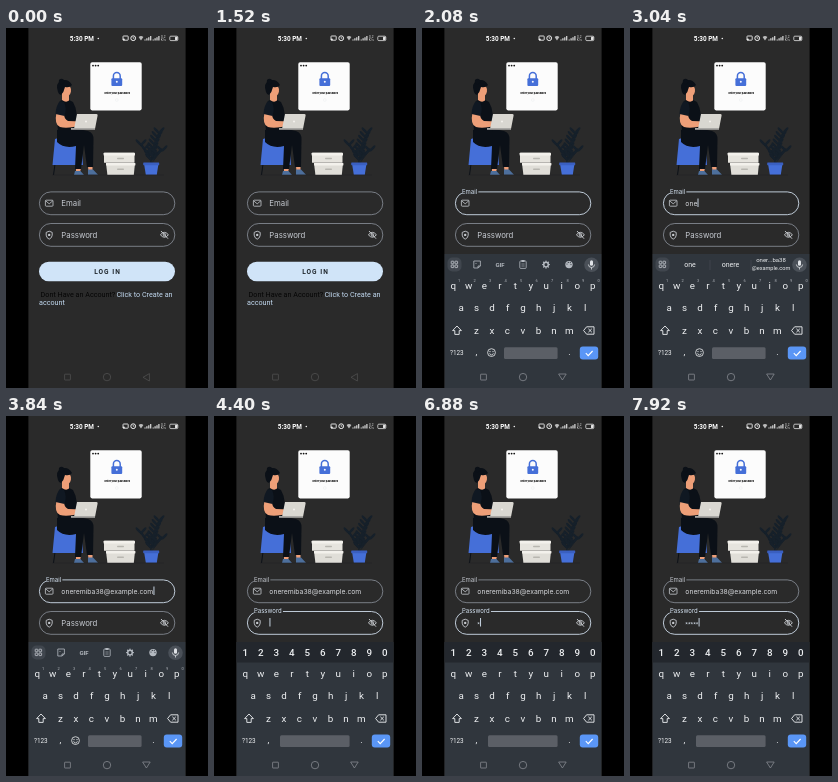
An HTML page with a canvas for the animation above (8000 ms loop, 202 by 360 pixels).

```html
<!DOCTYPE html>
<html lang="en">
<head>
<meta charset="utf-8">
<title>Login screen</title>
<style>
html, body { margin: 0; width: 100%; height: 100%; overflow: hidden; background: #000; }
canvas { display: block; width: 100vw; height: 100vh; }
</style>
</head>
<body>
<canvas id="stage"></canvas>
<script>
const W = 202, H = 360, LOOP = 8000;
const APP_X = 22.4, APP_W = 157.2;
const canvas = document.getElementById('stage');
const c = canvas.getContext('2d');
const BG = '#2a2a2a', BLUE = '#456fd8', SKIN = '#ee9f78', INK = '#0b1017', KEY = '#eef0f2';
const EMAIL = 'oneremiba38@example.com';
const INTER = 'Inter, sans-serif', ROBOTO = 'Roboto, sans-serif';

// Timeline (ms)
const EMAIL_FOCUS = 1570, KEYBOARD_UP = 1600, NAV_SWITCH = 1820, AUTOFILL = 3770, PASSWORD_FOCUS = 4290;
const emailKeys = [[2580, 'o'], [2760, 'n'], [2980, 'e']];
const passwordKeys = [
  [5080, '1'], [5270, '2'], [5460, '3'], [5650, '4'],
  [6230, '<'], [6470, '<'], [6790, '<'], [7030, '<'],
  [7440, 's'], [7550, 'd'], [7660, 'f'], [7760, 'g'], [7860, 'h']
];
const allKeys = [...emailKeys, ...passwordKeys];
const actions = [EMAIL_FOCUS, AUTOFILL, PASSWORD_FOCUS, ...allKeys.map(k => k[0])];

const clamp = v => Math.max(0, Math.min(1, v));
const easeOut = v => 1 - (1 - clamp(v)) ** 3;
const mix = (a, b, k) => a + (b - a) * k;

function box(x, y, w, h, r, fill, stroke, lw = 0.8) {
  c.beginPath();
  c.roundRect(x, y, w, h, r);
  if (fill) { c.fillStyle = fill; c.fill(); }
  if (stroke) { c.strokeStyle = stroke; c.lineWidth = lw; c.stroke(); }
}
const dot = (x, y, r, fill, stroke, lw) => box(x - r, y - r, 2 * r, 2 * r, r, fill, stroke, lw);
function shape(d, fill) {
  c.fillStyle = fill;
  c.fill(new Path2D(d));
}
function line(d, stroke, lw = 0.8) {
  c.strokeStyle = stroke;
  c.lineWidth = lw;
  c.stroke(new Path2D(d));
}
function text(s, x, y, size, fill, font = ROBOTO, align = 'left', weight = 400) {
  c.font = `${weight} ${size}px ${font}`;
  c.textAlign = align;
  c.fillStyle = fill;
  c.fillText(s, x, y);
  return c.measureText(s).width;
}

function statusBar() {
  text('5:30 PM', 63.8, 12.5, 6.4, '#fff', ROBOTO, 'left', 700);
  dot(92.3, 10.5, 0.8, '#eee');
  box(117, 8, 5.2, 4.2, 0.6, null, '#eee', 0.9);
  dot(117.8, 11.6, 1, '#eee');
  dot(127.2, 10.2, 2.4, null, '#eee', 1);
  line('M127.2 8.8V10.3H128.4', '#eee', 0.7);
  shape('M132.6 9Q135 7 137.4 9L135 12.6Z', '#bbb');
  for (const x of [138.4, 146.6])
    for (let i = 0; i < 4; i++) {
      const h = 1.2 + i * 1.1;
      box(x + i * 1.9, 12.6 - h, 1.2, h, 0, '#ddd');
    }
  text('0.2', 157.3, 9.8, 3.2, '#ddd', ROBOTO, 'center');
  text('K/s', 157.3, 13.2, 3.2, '#ddd', ROBOTO, 'center');
  box(163.8, 8.2, 8, 4.4, 1, null, '#e4e4e4');
  box(169, 8.8, 2.4, 3.2, 0.4, '#e4e4e4');
}

function illustration() {
  // Login card with lock
  box(84.3, 34.2, 51.4, 48.2, 1.8, '#fcfcfc');
  for (const x of [87, 89.6, 92.2]) dot(x, 37.6, 0.9, '#111');
  line('M107.4 51V48A3.4 3.4 0 0 1 114.2 48V51', BLUE, 1.5);
  box(105.4, 50.2, 10.8, 7.8, 1, BLUE);
  dot(110.8, 53.8, 1, '#f4f6ff');
  text('Enter your password', 111.2, 65.8, 2.5, '#000', INTER, 'center', 800);
  dot(110.8, 72, 1.4, null, '#e8eaee', 0.4);

  // Stool
  line('M49 136L47.5 147M74 136L75 147', INK, 1);
  shape('M49 111Q60 106 75 110L77 137H46.5Z', BLUE);

  // Legs and shoes
  shape('M82 138H86.5V144H82.5Z', SKIN);
  shape('M70 140H75L74 145H70Z', SKIN);
  shape('M82 141.5H87L92 146.8H82Z', '#4d6f9c');
  shape('M69 143H74.5L78 147H68Z', '#4d6f9c');
  shape('M51 102Q64 98 82 103Q88 105 87.5 112L87 139H81L78 117L75 141H69L70 118Q58 121 51 114Z', INK);

  // Body and head
  shape('M54 73Q60 69 67 74Q73 84 70 104H52Q50 86 54 73Z', INK);
  shape('M56 65H63V72.5Q60 75 56 72Z', SKIN);
  c.fillStyle = SKIN;
  c.beginPath();
  c.ellipse(60.2, 62.8, 4.8, 6, 0.15, 0, 7);
  c.fill();
  shape('M52 64Q49 55 55 53Q62 50 66 57Q64 60 59 59Q58 64 55 67Q53 67 52 64Z', INK);
  dot(55.5, 53.5, 2.7, INK);

  // Near arm: sleeve, bare elbow, forearm
  shape('M50.5 84L58 86Q58 91 62 93L75 93.5L76 97Q62 101 54 99Q48 97 50.5 84Z', SKIN);
  shape('M54 73Q50 77 49.5 86L58.5 88Q61 80 58 74Z', '#101822');

  // Laptop
  shape('M71 86H90.5Q92 86 91.6 87.5L89 101H68Z', '#d9d7d1');
  shape('M65 100H89V101.8H65Z', '#a9a8a5');
  dot(80, 93.5, 1, '#f4f2ee');

  // Boxes
  box(98, 124.8, 30.5, 10, 0.6, '#e6e4de');
  box(97.6, 124.8, 31.4, 2.6, 0.5, '#f3f1ec');
  shape('M100 135H129L127.8 147H101.4Z', '#e0ded8');
  box(100, 135, 29.4, 2.4, 0.3, '#f3f1ec');
  for (const y of [129.8, 140.6]) box(111, y, 7, 1.4, 0.7, '#b8b6b0');

  // Plant: slim leaflets in pairs along three curved stems
  const leafColor = '#16202a';
  const stem = (tipX, tipY, pairs) => {
    line(`M145 136Q145 ${tipY + 14} ${tipX} ${tipY}`, leafColor, 0.8);
    for (let i = 0; i < pairs; i++) {
      const k = (i + 1) / pairs;
      const x = mix(145, tipX, k * k), y = mix(134, tipY, k);
      for (const side of [-1, 1]) {
        c.fillStyle = leafColor;
        c.beginPath();
        c.ellipse(x + side * 2.6, y - 1.6, 4, 1.2, -side * 0.85, 0, 7);
        c.fill();
      }
    }
  };
  stem(153, 104, 8);
  stem(135, 116, 5);
  stem(156, 122, 4);
  shape('M138 135.5H152.5L150.8 146.8H139.8Z', BLUE);
  box(137.2, 134.6, 16, 2.6, 0.4, '#3a5fc0');
  line('M46 147H158', '#1d1e20', 0.5);
}

function field(label, y, lift, focused) {
  const h = 22.8;
  box(33.4, y, 135.4, h, h / 2, null, focused ? '#cfdcea' : '#a3abb7', focused ? 0.9 : 0.65);
  const size = mix(7.8, 6, lift), x = mix(55.3, 40, lift), base = mix(y + 14.5, y + 1.7, lift);
  if (lift) {
    c.font = `400 6px ${INTER}`;
    box(38.8, y - 1, (c.measureText(label).width + 2.4) * lift, 2, 0, BG);
  }
  text(label, x, base, size, focused ? '#d5e3f2' : '#c6cad1', INTER);
}

function form(t, typedEmail, typedPassword) {
  const inEmail = t >= EMAIL_FOCUS && t < PASSWORD_FOCUS;
  const inPassword = t >= PASSWORD_FOCUS;
  const emailLift = easeOut((t - EMAIL_FOCUS) / 150);
  field('Email', 163.9, emailLift, inEmail);
  field('Password', 195.5, easeOut((t - PASSWORD_FOCUS) / 110), inPassword);

  box(39.4, 172.2, 7.6, 6, 0.8, null, '#c6c9ce');
  line('M39.6 172.8L43.2 175.8L46.8 172.8', '#c6c9ce');
  line('M43.2 203.2L46.2 204.4V207.2Q46 210 43.2 211.2Q40.4 210 40.2 207.2V204.4Z', '#c6c9ce', 0.9);
  dot(43.2, 206.9, 1.2, '#c6c9ce');
  line('M154.4 206.8Q158.4 201.9 162.4 206.8Q158.4 211.7 154.4 206.8ZM155 203L162 210.7', '#d2d5da', 0.9);
  dot(158.4, 206.8, 1.3, null, '#d2d5da');

  const emailWidth = text(typedEmail, 55.3, 177.6, 6.8, '#d6d8dc', INTER);
  const passWidth = text('*'.repeat(typedPassword), 55.3, 209.6, 6.1, '#d5e0ec');
  const last = Math.max(...actions.filter(a => a <= t), 0);
  if (last && (t - last) % 1000 < 500) {
    const x = 55.5 + (inEmail ? emailWidth : passWidth);
    box(x, inEmail ? 170.4 : 202, 0.9, 8.6, 0, '#d5e3f2');
  }

  // The lower part settles slightly higher once a field is focused
  c.save();
  c.translate(0, -1.2 * emailLift);
  box(33, 233.7, 136, 19.6, 9.8, '#d0e4f8');
  c.letterSpacing = '1px';
  text('LOG IN', 88.2, 246, 6.6, '#20272e', ROBOTO, 'left', 600);
  c.letterSpacing = '0px';
  text('Dont Have an Account?', 34.6, 268.8, 7.2, '#050505');
  text('Click to Create an', 110.4, 268.8, 7.2, '#c3daf1');
  text('account', 33, 277, 7.2, '#c3daf1');
  c.restore();
}

// Letter keys: row strings with the x of their first key and their centre y
const rows = [['qwertyuiop', 31.3, 258], ['asdfghjkl', 39.1, 280], ['zxcvbnm', 54.4, 302.3]];
const digits = ['1234567890', 31.3, 237];
const PITCH = 15.5;

function keyRow([chars, x, y], weight = 400) {
  [...chars].forEach((ch, i) => text(ch, x + i * PITCH, y + 3.4, 9.8, KEY, ROBOTO, 'center', weight));
}

function keyPosition(ch) {
  for (const [chars, x, y] of [digits, ...rows]) {
    const i = chars.indexOf(ch);
    if (i >= 0) return [x + i * PITCH, y];
  }
}

function toolbar(typed) {
  box(25.5, 229.5, 14, 14, 5, '#40464e');
  for (const x of [29.2, 33]) for (const y of [233.2, 237]) box(x, y, 2.6, 2.6, 0.5, null, '#c8ccd2', 0.8);
  dot(169.5, 236.8, 7.3, '#4a5058');
  box(168, 232.2, 3, 5.6, 1.5, '#dfe2e6');
  line('M166.4 236.5Q166.6 239.5 169.5 239.5Q172.4 239.5 172.6 236.5M169.5 239.5V241.5', '#dfe2e6');

  if (typed) {
    text(typed, 60, 239.4, 7, KEY, ROBOTO, 'center');
    text('onere', 100.5, 239.4, 7, KEY, ROBOTO, 'center');
    text('oner...ba38', 141, 234.4, 6, KEY, ROBOTO, 'center');
    text('@example.com', 141, 242.4, 5.6, KEY, ROBOTO, 'center');
    line('M80 232V242M121 232V242', '#4a5058', 0.6);
    return;
  }
  const grey = '#b4b9c0';
  line('M51.8 233H58.4V238L56 240H51.8ZM56 240V238H58.4', grey);
  dot(54, 235.6, 0.5, grey);
  text('GIF', 78, 239, 6, grey, ROBOTO, 'center', 700);
  box(97.8, 233, 6.4, 7.4, 0.8, null, grey);
  box(99.4, 232, 3.2, 2, 0.4, grey);
  line('M99.4 236H102.6M99.4 238H102.6', grey, 0.6);
  dot(124, 236.6, 2.3, null, grey, 1.5);
  for (let i = 0; i < 8; i++) {
    const a = i * Math.PI / 4;
    dot(124 + 3.4 * Math.cos(a), 236.6 + 3.4 * Math.sin(a), 0.7, grey);
  }
  dot(147, 236.6, 3.7, grey);
  for (const [x, y] of [[145, 236], [146.3, 234.4], [148.3, 234.6], [149, 236.6]]) dot(x, y, 0.6, '#30363d');
}

function keyboard(t, typedEmail) {
  if (t < KEYBOARD_UP) return;
  const secret = t >= PASSWORD_FOCUS;
  c.save();
  c.beginPath();
  c.rect(APP_X, 0, APP_W, H);
  c.clip();
  c.globalAlpha = clamp((t - KEYBOARD_UP) / 290);
  c.translate(0, 134 * (1 - easeOut((t - KEYBOARD_UP) / 440)));
  box(APP_X, 226, APP_W, 140, 0, '#30363d');
  if (secret) {
    box(APP_X, 226, APP_W, 20.5, 0, '#23272d');
    keyRow(digits, 500);
  } else {
    toolbar(t < AUTOFILL ? typedEmail : '');
    [...digits[0]].forEach((d, i) => text(d, 37.2 + i * PITCH, 254, 4, '#aeb2b8', ROBOTO, 'center'));
  }
  rows.forEach(r => keyRow(r));

  line('M35 298L39.4 302.6H37.2V306.4H32.8V302.6H30.6Z', KEY, 0.9);
  const deleting = [[6150, 6390], [6450, 6630], [6780, 6860], [6960, 7190]]
    .some(([a, b]) => t >= a && t < b);
  if (deleting) box(157, 294, 21, 18, 4, '#50565e');
  line('M161.6 302.5L164.6 298.8H172V306.2H164.6ZM166.4 300.8L169.8 304.2M169.8 300.8L166.4 304.2', KEY, 0.9);

  text('?123', 34.8, 327, 6.4, KEY, ROBOTO, 'center');
  text(',', 54.4, 327, 9, KEY, ROBOTO, 'center');
  if (!secret) {
    dot(69.5, 324.6, 3.9, null, KEY);
    dot(68, 323.6, 0.6, KEY);
    dot(71, 323.6, 0.6, KEY);
    line('M67.4 325.6Q69.5 328.4 71.6 325.6', KEY, 0.8);
  }
  const left = secret ? 66 : 82;
  box(left, 319.2, 135.6 - left, 11.8, 1.5, '#5b5f66');
  text('.', 147.5, 327, 9, KEY, ROBOTO, 'center');
  box(157.8, 318.6, 18.4, 13, 3, '#5a96f6');
  line('M163.8 325.2L166.2 327.6L170.6 323', '#fff', 1.1);

  for (const [time, ch] of allKeys) {
    if (ch === '<' || Math.abs(t - time) > 50) continue;
    const [x, y] = keyPosition(ch);
    box(x - 8, y - 27, 16, 31, 3, '#4a5058');
    text(ch, x, y - 13, 12, '#fff', ROBOTO, 'center');
  }
  c.restore();
}

function navigation(t) {
  const open = t >= NAV_SWITCH, color = t >= KEYBOARD_UP ? '#868a90' : '#505050';
  box(58.6, 346.2, 5.8, 5.8, 0.3, null, color);
  dot(101, 349.1, 3.7, null, color);
  line(open ? 'M136.6 346H144.2L140.4 352Z' : 'M143.4 345.6V353L137 349.3Z', color);
}

function draw(now) {
  const t = now % LOOP, scale = devicePixelRatio || 1;
  const w = Math.round(innerWidth * scale), h = Math.round(innerHeight * scale);
  if (canvas.width !== w || canvas.height !== h) {
    canvas.width = w;
    canvas.height = h;
  }
  c.setTransform(w / W, 0, 0, h / H, 0, 0);
  box(0, 0, W, H, 0, '#000');
  box(APP_X, 0, APP_W, H, 0, BG);

  const typedEmail = t >= AUTOFILL ? EMAIL
    : emailKeys.filter(k => k[0] <= t).map(k => k[1]).join('');
  const typedPassword = passwordKeys.filter(k => k[0] <= t)
    .reduce((n, k) => n + (k[1] === '<' ? -1 : 1), 0);

  statusBar();
  illustration();
  form(t, typedEmail, typedPassword);
  keyboard(t, typedEmail);
  navigation(t);
}

function tick() {
  draw(performance.now());
  requestAnimationFrame(tick);
}
tick();
</script>
</body>
</html>
```
